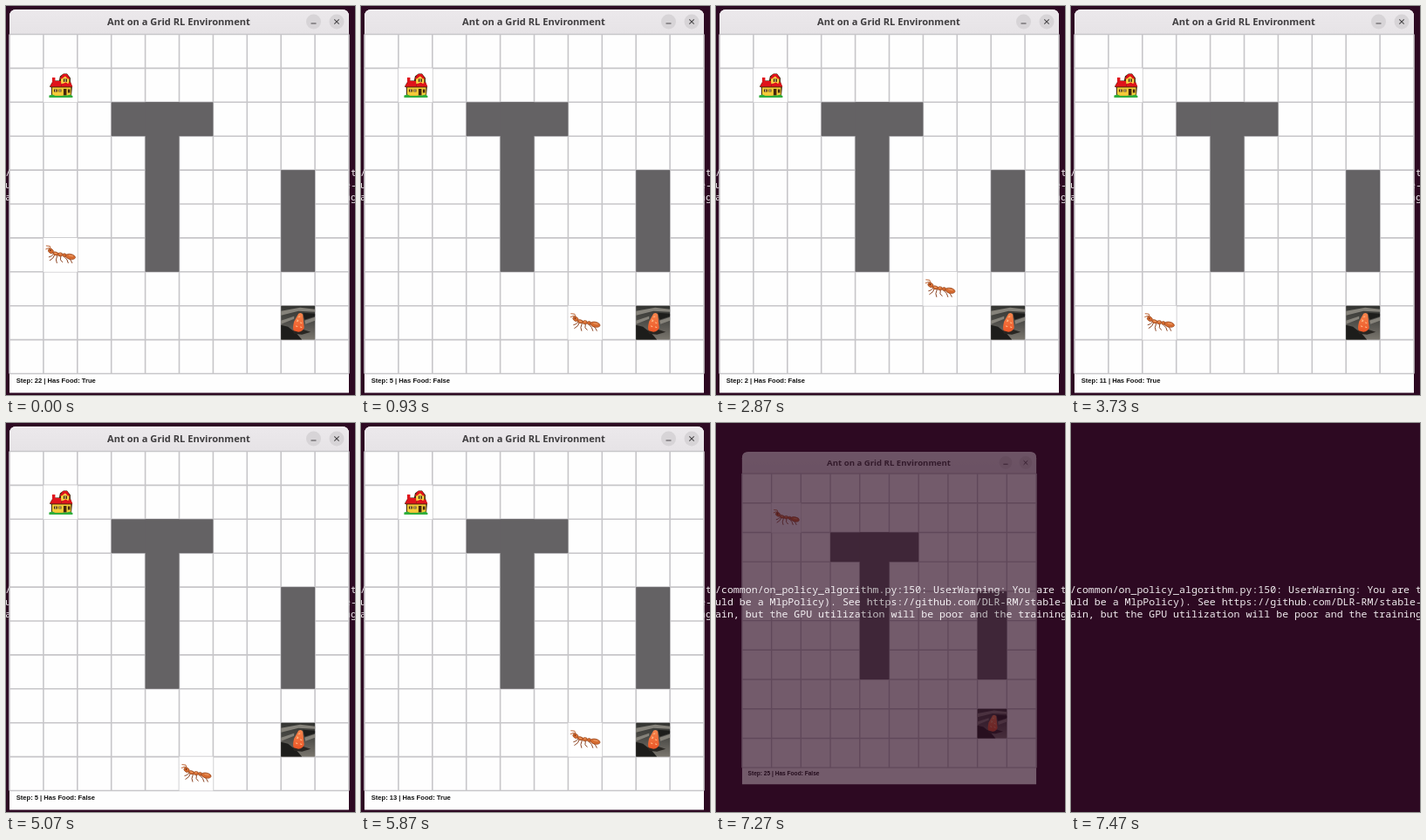
Recreate the animation shown at these times as an HTML page. Size 400x446 px, loop 7.6 s.

```html
<!DOCTYPE html>
<html lang="en">
<head>
<meta charset="utf-8">
<title>Ant on a Grid</title>
<style>
  html, body { margin: 0; width: 100%; height: 100%; overflow: hidden; background: #2d0922; }
  svg { display: block; width: 100vw; height: 100vh; }
  .term { font: 11.58px "Noto Sans Mono", "DejaVu Sans Mono", monospace; fill: #f1ebef; white-space: pre; }
  .title { font: bold 11.1px "Open Sans", sans-serif; fill: #3f3d3f; text-anchor: middle; }
  .status { font: bold 7.6px "Liberation Sans", Arial, sans-serif; fill: #111; }
</style>
</head>
<body>
<svg viewBox="0 0 400 446">
  <defs>
    <linearGradient id="bar" x2="0" y2="1">
      <stop stop-color="#f6f3f5"/><stop offset=".1" stop-color="#ebe8eb"/><stop offset="1" stop-color="#e6e3e6"/>
    </linearGradient>
    <linearGradient id="ground" x2="0" y2="1">
      <stop stop-color="#343532"/><stop offset=".45" stop-color="#4c4b47"/><stop offset="1" stop-color="#7a766e"/>
    </linearGradient>
    <linearGradient id="fruit" x2="0" y2="1">
      <stop stop-color="#f7854c"/><stop offset="1" stop-color="#ec5526"/>
    </linearGradient>
  </defs>
  <rect width="400" height="446" fill="#2d0922"/>
  <g class="term">
    <text x="-1" y="195">/common/on_policy_algorithm.py:150: UserWarning: You are t</text>
    <text x="-1" y="209">uld be a MlpPolicy). See https://github.com/DLR-RM/stable-</text>
    <text x="-1" y="223">ain, but the GPU utilization will be poor and the training</text>
  </g>

  <g id="window">
    <path d="M4 443.5V12q0-8 8-8H385q8 0 8 8V443.5z" fill="#fefefe"/>
    <path d="M4 32.5V12q0-8 8-8H385q8 0 8 8V32.5z" fill="url(#bar)"/>
    <text class="title" x="198" y="22">Ant on a Grid RL Environment</text>
    <g fill="#d7d4d7"><circle cx="352.5" cy="18" r="8.5"/><circle cx="379" cy="18" r="8.5"/></g>
    <path d="M349.5 20h6M376.3 15.3l5.4 5.4m0-5.4l-5.4 5.4" stroke="#4a484a" stroke-width="1.1" fill="none"/>
    <path id="lines" stroke="#c7c6c9" stroke-width="1.6" fill="none"/>
    <g id="walls" fill="#646264"></g>

    <g id="home">
      <rect width="38.9" height="38.9" fill="#fff"/>
      <path d="M9 32V22L7 21L11 14H18L19 9L23 6H27L31 11V15L33 21L32 32z" fill="#3a2208"/>
      <path d="M10 22H31.5V31.5H10z" fill="#f4cc38"/>
      <path d="M20 11L25 7.5L29.5 11.5V18H20z" fill="#f6d040"/>
      <path d="M7.5 21L11 14.5H20L21 21zM18.5 12L22.5 6.5H27L30.5 12H28L25 9L21 12zM27.5 21L29 16H31L33.5 21zM10 10.5h3.5V15H10z" fill="#e0141c"/>
      <path d="M23 12h4v3.5h-4zM12 24h4v3h-4zM17.5 24h3v3h-3zM23 23.5h3.5V31H23zM28 24h2.5v4H28z" fill="#43250d"/>
      <path d="M21 18l5-2 3 2.5-1 2.5h-7z" fill="#e0141c"/>
      <path d="M13.5 24h1v3h-1zM18.5 24h1v3h-1zM24.5 12h1v3.5h-1z" fill="#fff0a0"/>
      <path d="M6.5 31l4-1 3 1.5h8l2-.5h4l3-1 3 1.5V33.5H6.5z" fill="#2fae3c"/>
    </g>

    <g id="food">
      <rect width="38.9" height="38.9" fill="url(#ground)"/>
      <path d="M0 6L22 2L38.9 4V7L20 6L0 11zM0 17L15 12V15L0 21zM27 17L38.9 13V17L28 21z" fill="#85827a"/>
      <path d="M0 22L8 24L18 32L24 38.9H0zM25 8L38.9 9V12L27 16z" fill="#1d1d1b"/>
      <path d="M13 28L25 27L34 30L24 33L15 32z" fill="#292622"/>
      <path d="M20 9Q23 7 25 10L26.5 25Q25 29.5 20 30L14.5 28.5Q13 25 15 18z" fill="url(#fruit)"/>
      <path d="M20 13l2-1m-4 6l2-1m2 2l2 1m-7 3l2 1m3 0l2 1m-6-9l2 1" stroke="#ffb884" stroke-width="1.1"/>
    </g>

    <g id="ant">
      <rect width="38.9" height="38.9" fill="#fff"/>
      <g fill="none" stroke="#8d4524" stroke-width="1">
        <path d="M7.5 14L6.5 11.5L2.5 13M8.5 13L7.5 9.5L3 9" stroke="#bd6434"/>
        <path d="M13 19L11 23L7 26M16 20L14.5 25L15.5 29M20 20.5L19.5 25L22 28M23 20.5L27 25L28.5 29M25 21L31 25L33 29M12 18L9 21L6 22"/>
      </g>
      <g fill="#d66b30" stroke="#8d4018" stroke-width=".6">
        <ellipse cx="8.5" cy="15" rx="3.2" ry="2.5" transform="rotate(35 8.5 15)"/>
        <ellipse cx="14" cy="18" rx="3.2" ry="1.9" transform="rotate(15 14 18)"/>
        <ellipse cx="19.3" cy="19" rx="2.7" ry="2.1"/>
        <ellipse cx="24" cy="19.7" rx="2.2" ry="1.9"/>
        <ellipse cx="31" cy="21.5" rx="5.7" ry="3" transform="rotate(12 31 21.5)"/>
      </g>
      <path d="M29 20l5 1M12.5 17.3l3 .6M18.3 18.2h2" stroke="#f3aa74" stroke-width=".9"/>
      <circle cx="8" cy="14.4" r=".7" fill="#3a1606"/>
    </g>
    <text id="status" class="status" x="11.7" y="432.2"></text>
  </g>
</svg>
<script>
const LOOP = 7600, CELL = 38.9, LEFT = 4, TOP = 32.5;
const $ = id => document.getElementById(id);
const cellX = c => LEFT + c * CELL, cellY = r => TOP + r * CELL;
const place = (id, c, r) => $(id).setAttribute('transform', `translate(${cellX(c)} ${cellY(r)})`);

let grid = '';
for (let i = 0; i <= 10; i++) {
  grid += `M${cellX(i)} ${TOP}V${cellY(10)}M${LEFT} ${cellY(i)}H${cellX(10)}`;
}
$('lines').setAttribute('d', grid);

// column, row, width, height in cells
const WALLS = [[3, 2, 3, 1], [4, 2, 1, 5], [8, 4, 1, 3]];
$('walls').innerHTML = WALLS.map(([c, r, w, h]) =>
  `<rect x="${cellX(c)}" y="${cellY(r)}" width="${w * CELL}" height="${h * CELL}"/>`).join('');
place('home', 1, 1);
place('food', 8, 8);

const WAY_HOME = [[8, 8], [2, 8], [2, 7], [1, 7], [1, 1]];
const EPISODES = [
  { step: 22, fed: true, path: [[1, 6], [1, 1]] },
  { step: 1, path: [[5, 5], [5, 8], ...WAY_HOME] },
  { step: 0, path: [[6, 5], [6, 8], ...WAY_HOME] },
  { step: 1, path: [[3, 7], [3, 9], [9, 9], [9, 8], ...WAY_HOME] }
];

// Walk each path one cell at a time
const moves = EPISODES.flatMap(({ step, fed = false, path }) => {
  let [c, r] = path[0];
  const out = [];
  const visit = () => {
    if (c === 8 && r === 8) fed = true;
    if (c === 1 && r === 1) fed = false;
    out.push({ c, r, step: step++, fed });
  };
  visit();
  for (const [toC, toR] of path.slice(1)) {
    while (c !== toC || r !== toR) {
      c += Math.sign(toC - c);
      r += Math.sign(toR - r);
      visit();
    }
  }
  return out;
});

function moveIndex(t) {
  const rest = t % 200;
  return 2 * Math.floor(t / 200) + (rest >= 70) + (rest >= 130);
}

function render(t) {
  const { c, r, step, fed } = moves[Math.min(moveIndex(t), moves.length - 1)];
  place('ant', c, r);
  $('status').textContent = `Step: ${step} | Has Food: ${fed ? 'True' : 'False'}`;

  const closing = [7200, 7270, 7330].filter(at => t >= at).length / 3;
  const scale = 1 - 0.2 * closing;
  $('window').setAttribute('opacity', 1 - closing);
  $('window').setAttribute('transform',
    `translate(198.5 224) scale(${scale}) translate(-198.5 -224)`);
}

const start = performance.now();
function tick() {
  render((performance.now() - start) % LOOP);
  requestAnimationFrame(tick);
}
tick();
</script>
</body>
</html>
```
